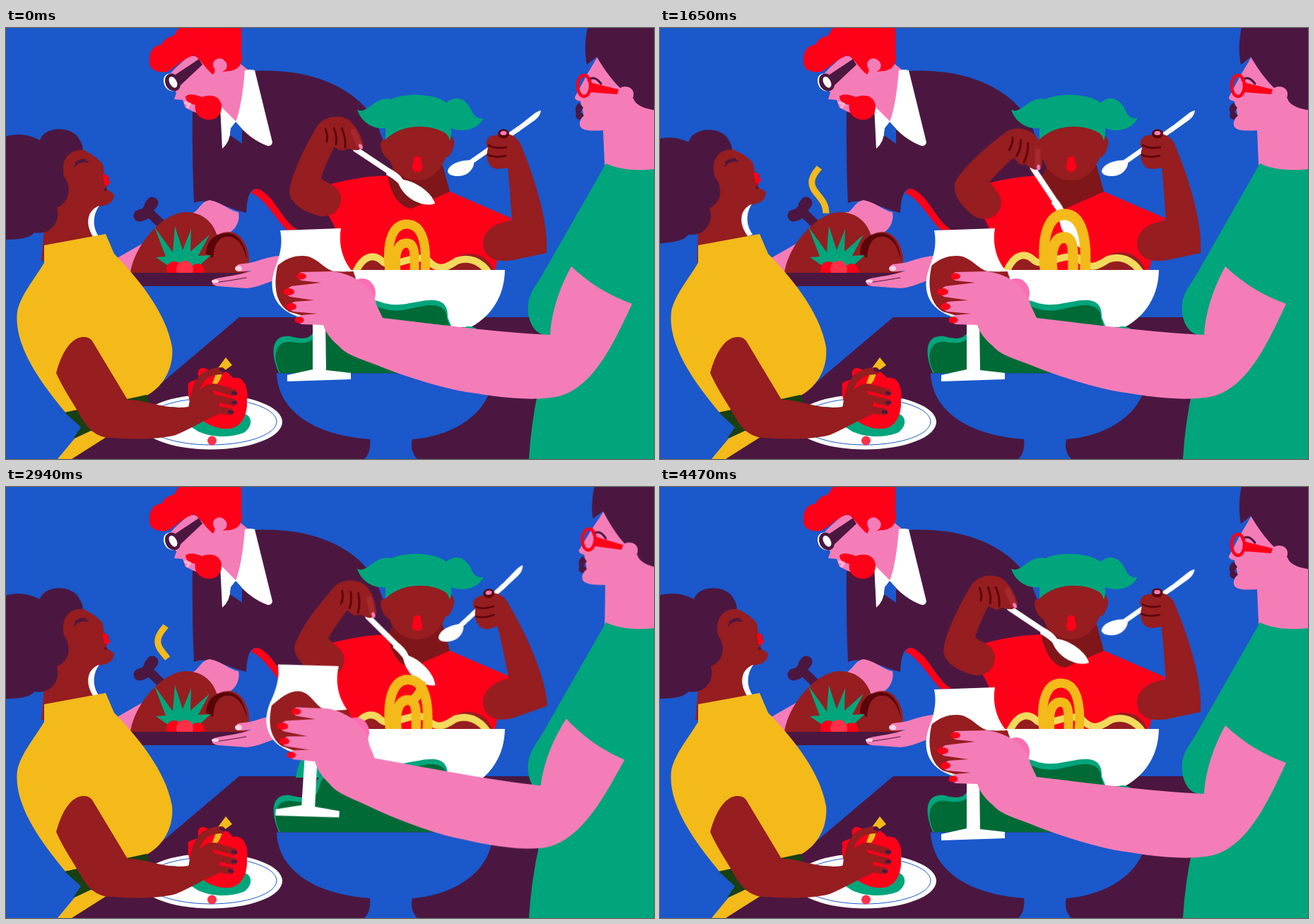
An HTML page for the animation above (4.5 s loop, 917x611 px).

```html
<!DOCTYPE html>
<html lang="en">
<head>
<meta charset="utf-8">
<title>Dinner party</title>
<style>
html, body { margin: 0; width: 100%; height: 100%; overflow: hidden; background: #1b58cb; }
svg { display: block; width: 917px; height: 611px; }

.blue { fill: #1b58cb; } .plum { fill: #4b1740; } .red { fill: #ff0019; } .pink { fill: #f47db8; }
.brown { fill: #961d20; } .maroon { fill: #5a0508; } .green { fill: #00a57b; } .forest { fill: #006a36; }
.gold { fill: #f3ba1a; } .white { fill: #fff; } .coral { fill: #ff3048; }
.line { fill: none; stroke-linecap: round; stroke-linejoin: round; }
.s-plum { stroke: #4b1740; } .s-maroon { stroke: #5a0508; } .s-gold { stroke: #f3ba1a; }
.s-brown { stroke: #961d20; } .s-white { stroke: #fff; }

.move { animation: 4.5s ease-in-out infinite; }

.sniff { animation-name: sniff; transform-origin: 90px 290px; }
@keyframes sniff {
  0%, 1%, 53.5%, 63.5%, 99.5%, 100% { transform: none; }
  13%, 39%, 77.5%, 85.5% { transform: rotate(-3.3deg); }
}
.dip { animation-name: dip; transform-origin: 450px 243px; }
@keyframes dip {
  0%, 1%, 53.5%, 59%, 100% { transform: translate(0, 0) rotate(0deg); }
  25%, 38%, 71.8%, 85.5% { transform: translate(9px, 4px) rotate(22.5deg); }
}
.feed { animation-name: feed; transform-origin: 700px 305px; }
@keyframes feed {
  0%, 37.5%, 71.8%, 78%, 100% { transform: rotate(0deg); }
  52%, 59%, 91% { transform: rotate(-15.2deg); }
}
.toast { animation-name: toast; transform-origin: 948px 219px; }
@keyframes toast {
  0%, 37.3%, 84.7%, 100% { transform: rotate(0deg); }
  58.6% { transform: rotate(4.2deg); }
}
.lean { animation-name: lean; transform-origin: 955px 195px; }
@keyframes lean {
  0%, 37.3%, 84.7%, 100% { transform: rotate(0deg); }
  58.6% { transform: rotate(3.8deg); }
}
.wine { animation-name: wine; }
@keyframes wine {
  0%, 38%, 72%, 96%, 100% { d: path("M370 352C388 330 402 323 420 323C440 323 450 343 465 345C478 346 490 345 500 345V420H370Z"); }
  48% { d: path("M370 338C388 333 402 344 422 342C440 340 450 326 465 325C478 325 490 335 500 338V420H370Z"); }
  58.6% { d: path("M370 364C392 350 402 323 420 323C434 323 440 345 452 348C470 352 484 344 500 342V420H370Z"); }
  84% { d: path("M370 346C392 322 404 346 416 330C434 308 446 334 462 338C474 341 490 345 500 346V420H370Z"); }
}
.twirl { animation-name: twirl; transform-origin: 566px 343px; }
@keyframes twirl {
  0%, 14%, 50%, 62%, 82%, 100% { transform: none; }
  28%, 38%, 70%, 73% { transform: translateX(5px) scale(1.12, 1.21); }
}
.wave { animation-name: wave; }
@keyframes wave {
  0%, 13.3%, 58%, 83%, 100% { transform: none; }
  6.6%, 91% { transform: translate(-2px, 1px); }
  30%, 38%, 71% { transform: translate(-4px, -2px); }
}
.slurp { stroke-dasharray: 1 3; animation-name: slurp; }
@keyframes slurp {
  0%, 42%, 67%, 100% { stroke-dashoffset: 1.02; }
  56%, 59.5% { stroke-dashoffset: 0; }
}
.glint { animation-name: glint; transform-origin: 360px 276px; }
@keyframes glint {
  0%, 53%, 64%, 100% { transform: scale(0); }
  57.5%, 59.5% { transform: scale(1); }
}
.steam { animation-timing-function: linear; }
.steam-a { stroke-dasharray: .8 3; animation-name: steam-a; }
@keyframes steam-a {
  0%, 4.2%, 27.31%, 36%, 59.81%, 70.8%, 94.01%, 100% { stroke-dashoffset: .8; }
  27.3%, 59.8%, 94% { stroke-dashoffset: -1; }
}
.steam-b { stroke-dasharray: .9 3; animation-name: steam-b; }
@keyframes steam-b {
  0%, 27.8%, 44.91%, 54.6%, 71.01%, 100% { stroke-dashoffset: .9; }
  44.9%, 71% { stroke-dashoffset: -1; }
}
</style>
</head>
<body>
<svg viewBox="0 0 917 611">
  <defs>
    <clipPath id="inGlass"><path d="M390 318C380 346 374 385 400 402L430 411H470L494 372L495 355L482 318Z"/></clipPath>
    <clipPath id="aboveBowl"><path d="M400 100H800V343H400Z"/></clipPath>
    <clipPath id="aboveTray"><path d="M150 200H360V347H150Z"/></clipPath>
  </defs>
  <rect class="blue" width="917" height="611"/>

  <!-- waiter -->
  <g>
    <path class="plum" d="M303 108L264 119Q263 185 266 248C290 239 318 258 340 262C341 242 344 230 353 228L406 287H520L550 200L530 150C518 108 462 55 350 61Z"/>
    <path class="red" d="M347 234C353 222 363 230 375 242C388 258 400 281 412 285L398 287C380 269 365 240 347 234Z"/>
    <path class="pink" d="M258 40C244 54 232 62 228 72C232 84 240 88 241 92L238 101L250 102L254 113L264 118L290 128L303 112L325 140L346 62L318 40Z"/>
    <path class="white" d="M338 60Q345 58 352 60L377 162Q376 168 370 167Q345 158 325 133Q334 110 338 60ZM303 110L326 133L318 144Q317 162 306 171Z"/>
    <path class="blue" d="M318 142L325 133L334 143V164L317 152Z"/>
    <path class="red" d="M249 -3C238 4 242 10 234 12C224 14 222 22 219 24C208 24 202 36 203 47C202 58 212 64 228 62C240 57 252 42 266 39C276 44 282 58 293 66Q297 62 295 56A9 9 0 1 1 306 62L316 61C326 60 334 54 334 42C332 28 335 10 332 -3Z"/>
    <circle class="pink" cx="302" cy="52" r="9"/>
    <path class="plum" d="M240 66L273 44L278 52L246 82Z"/>
    <ellipse class="white" cx="234" cy="77" rx="10.5" ry="13" transform="rotate(-28 234 77)"/>
    <ellipse class="plum" cx="236" cy="77" rx="10.5" ry="13" transform="rotate(-28 236 77)"/>
    <ellipse class="white" cx="236.500" cy="77" rx="5" ry="8.500" transform="rotate(-28 236 77)"/>
    <path class="red" d="M254 97C260 92 270 95 277 98C290 93 302 96 305 109C306 124 296 131 286 130C272 129 266 118 268 109C262 108 254 105 254 97Z"/>
    <path class="line" stroke="#ffb0d2" stroke-width="4" d="M254 106L260 108L257 112"/>

    <path class="line s-gold move steam steam-a" style="stroke-linecap:butt" stroke-width="9" pathLength="1" d="M264 266C262 236 238 232 243 213C245 204 249 200 254 193"/>
    <path class="line s-gold move steam steam-b" style="stroke-linecap:butt" stroke-width="9" pathLength="1" d="M234 270C240 240 212 236 215 216C217 206 222 203 226 197"/>

    <path class="pink" d="M264 263C275 256 276 246 288 244C305 247 318 260 329 261C332 276 322 291 308 293L280 292ZM154 328L194 305L176 349Z"/>
    <path class="line s-plum" stroke-width="13" d="M199 258L225 283"/>
    <path class="line s-plum" stroke-width="17" d="M207 248L204 252M189 266L195 264"/>
    <path class="brown" d="M176 347C181 310 220 262 254 261C280 261 296 278 300 300L302 347Z"/>
    <path class="brown" d="M282 347C278 305 295 289 316 289C334 290 344 312 344 330L341 347Z"/>
    <path class="maroon" d="M283 320C284 300 296 291 314 291C330 291 340 310 341 328C334 300 322 294 310 296C300 298 294 308 293 326Z"/>
    <g clip-path="url(#aboveTray)">
      <path class="green" d="M228 336L212 325L226 324L210 282L236 318L239 281L250 315L262 285L261 317L288 293L272 323L290 322L270 340Z"/>
      <circle class="red" cx="238" cy="342" r="11"/><circle class="red" cx="271" cy="344" r="10"/>
      <circle class="coral" cx="253" cy="342" r="12"/>
    </g>
    <path class="plum" d="M174 347H345L340 366H179Z"/>
    <path class="pink" d="M395 322C368 324 356 331 345 333L329 335C322 339 327 347 336 345L348 344C330 351 308 352 295 356C290 360 291 365 300 366L340 369C362 367 372 358 400 352Z"/>
    <path class="line s-plum" stroke-width="1" d="M296 361Q318 358 340 354"/>
    <ellipse cx="329" cy="341" rx="5" ry="4" fill="#ffd3e6"/><ellipse cx="296" cy="359" rx="5" ry="2.500" fill="#ffd3e6"/>
  </g>
  <path class="red move glint" d="M360 253Q364 269 375 276Q364 283 360 299Q356 283 345 276Q356 269 360 253Z"/>

  <path class="plum" d="M330 410H760V611H93Z"/>

  <!-- diner in the middle -->
  <g>
    <path class="red" d="M460 221C490 214 520 208 545 210L626 231L716 270C690 295 702 318 691 345H468C476 310 470 285 454 263Z"/>
    <path d="M540 212C546 236 556 254 574 256L628 232L618 195H548Z" fill="#7f161a"/>
    <path class="brown" d="M530 168Q529 158 538 158L537 150C555 128 608 128 626 152Q636 154 634 166Q630 182 622 184C614 206 598 216 582 216C564 216 548 204 543 188Q533 182 530 168Z"/>
    <path class="green" d="M497 116C512 123 522 95 546 101C562 92 606 92 623 106C640 92 654 104 660 120Q666 130 676 128C666 146 645 148 630 142Q631 152 628 160Q626 150 618 147C596 136 560 136 537 158V142C520 144 503 134 497 116Z"/>
    <path class="red" d="M582 182C588 182 588 187 587 190C592 196 589 204 582 204C575 204 572 196 577 190C576 187 576 182 582 182Z"/>
  </g>

  <g class="move feed">
    <path class="s-white line" stroke-width="7" d="M658 190L725 143"/>
    <path class="white" d="M720 143L748 121Q754 117 757 117Q756 125 748 131L724 148Z"/>
    <path class="white" d="M625 203C627 192 646 186 662 188C664 198 654 210 640 210Q626 210 625 203Z"/>
    <path class="brown" d="M716 273C688 276 672 291 676 311C680 330 700 333 722 328L765 319C768 275 748 212 728 164C720 148 702 148 697 152C680 150 677 164 682 170C678 184 682 200 697 200L710 198C713 225 714 250 716 273Z"/>
    <path class="line s-maroon" stroke-width="2.500" d="M683 166Q692 172 708 169M682 180Q693 185 707 181"/>
    <ellipse class="maroon" cx="704" cy="150" rx="8" ry="6.500"/><ellipse cx="704" cy="149" rx="4.500" ry="3" class="pink"/>
  </g>

  <g class="move dip">
    <path class="line s-white" stroke-width="8" d="M495 172L546 206"/>
    <path class="white" d="M540 198Q556 205 562 215C582 218 604 235 607 249C594 254 566 246 555 220Q546 212 538 208Z"/>
    <path class="brown" d="M401 232C404 205 425 165 441 138C452 123 478 121 489 134C498 143 504 156 506 167L499 173C490 175 485 168 479 173C474 176 470 170 464 169C457 184 449 201 446 213C456 222 471 222 474 240C475 257 462 268 446 267C424 262 402 250 401 232Z"/>
    <path class="line" stroke="#a52a30" stroke-width="8" d="M492 147L500 166"/>
    <path class="line s-maroon" stroke-width="2.800" d="M452 143Q456 152 454 161M464 142Q469 154 467 165M475 142Q481 155 480 169"/>
    <ellipse class="pink" cx="502" cy="168" rx="2.500" ry="4" transform="rotate(-25 502 168)"/>
  </g>

  <!-- pasta and bowls -->
  <g clip-path="url(#aboveBowl)">
    <g class="move wave">
      <path class="brown" d="M500 350C506 325 530 318 546 350ZM604 350C625 336 638 320 655 320C678 320 688 334 692 350Z"/>
      <path class="line" stroke="#f3da5c" stroke-width="10" d="M494 348C506 320 522 320 534 332C548 342 575 320 596 328C612 348 626 338 638 330C655 324 672 330 684 348"/>
    </g>
    <g class="line s-gold">
      <g class="move twirl" stroke-width="13">
        <path d="M543 345C537 300 549 278 567 278C590 278 596 308 593 345M552 345C549 316 556 304 568 305C580 306 578 325 578 345"/>
      </g>
      <path class="move slurp" stroke-width="13" pathLength="1" d="M578 300C592 288 592 268 580 252C566 236 546 228 551 213C556 200 574 198 586 206C606 220 620 262 638 265C654 266 655 240 662 227"/>
    </g>
  </g>
  <path class="white" d="M480 343H706C705 384 684 410 658 424H500Z"/>
  <path class="green" d="M410 412Q413 392 419 386L445 384V412ZM637 432Q655 414 673 432Z"/>
  <path class="green" d="M386 489C372 456 378 434 402 437C430 445 436 436 440 416C460 386 500 380 526 387C552 397 568 390 584 388C612 382 626 388 625 410L634 432V489Z"/>
  <path class="forest" d="M388 489.500C374 462 384 442 404 445C432 450 440 442 446 416C466 392 500 388 526 395C552 406 568 398 586 395C614 389 624 398 624 412L634 440V489.500Z"/>
  <path class="blue" d="M383 489.500H688C690 540 640 578 575 583Q571 600 582 611H507Q517 602 515 583C440 578 385 545 383 489.500Z"/>

  <!-- plate -->
  <ellipse class="white" cx="290" cy="558.500" rx="101" ry="39"/>
  <ellipse cx="290" cy="558" rx="93" ry="33" fill="none" stroke="#1b58cb"/>
  <path class="green" d="M218 541C235 532 250 540 264 546L334 546C350 548 350 566 336 574C315 582 290 580 272 572C256 562 240 548 218 541Z"/>
  <path class="red" d="M258 508C254 500 272 500 273 496C268 482 278 478 288 486C300 480 314 486 321 496C336 492 344 510 341 528C342 548 334 566 316 568C290 570 268 552 262 535Q256 520 258 508Z"/>
  <path class="gold" d="M292 504L300 482L311 467L320 478L306 488Q304 500 298 505Z"/>
  <circle class="coral" cx="291.500" cy="585" r="6.500"/>

  <!-- diner on the left -->
  <g class="move sniff">
    <path class="brown" d="M50 330L54 285L70 215C66 180 90 160 112 174Q128 182 137 193L139 206L146 212L142 228L153 236C152 248 145 251 131 253C120 258 114 275 124 296L132 330Z"/>
    <path class="plum" d="M-40 168C-10 160 10 140 48 159C55 138 96 138 105 160C110 168 110 175 105 173C86 174 78 190 82 210C96 230 86 250 72 254C78 276 62 294 40 290C32 300 14 301 -40 300Z"/>
    <path class="white" d="M132 252C115 258 111 278 124 297L131 295C121 280 124 263 132 252Z"/>
    <path class="line s-plum" stroke-width="2" d="M97 196Q104 187 116 190"/>
    <path class="line s-plum" stroke-width="3" d="M99 191Q105 187 112 187"/>
    <path class="red" d="M137 207L145 210L144 215L148 218L143 224L139 222Z"/>
    <circle class="plum" cx="141" cy="229" r="2"/>
  </g>
  <path class="gold" d="M54 308L141 292L153 320C182 350 226 400 235 452C238 485 220 510 199 521L84 545C50 504 10 450 16 402C20 380 40 356 54 333Z"/>
  <path d="M83 545L199 520L204 535L120 572L95 582L106 566Z" fill="#184012"/>
  <path class="gold" d="M97 582L120 571L145 578L93 611H73Z"/>
  <path class="brown" d="M71 489C79 460 92 438 110 438Q120 438 124 447L172 527C198 526 224 542 258 537C264 522 272 512 286 505L302 530L300 548C280 556 262 568 240 577C214 584 178 583 146 581C128 580 116 568 107 553C98 536 82 514 71 489Z"/>
  <g class="line s-brown" stroke-width="10">
    <path d="M264 534Q268 503 281 493Q292 486 305 486"/>
    <path d="M270 526Q286 506 298 510L322 517"/>
    <path d="M270 540Q290 520 302 526L322 531"/>
    <path d="M272 551Q292 538 304 542L317 544"/>
  </g>
  <path class="line s-plum" stroke-width="4.500" d="M304 484L309 486M321 517L325 518M321 531L325 531M316 544L320 545"/>

  <!-- diner on the right -->
  <g class="move lean">
    <path class="pink" d="M838 38C830 54 824 62 820 70L805 98Q804 102 813 104L817 122L812 133C810 144 820 147 845 145L848 215H940V60Z"/>
    <path class="plum" d="M836 -40C818 0 818 30 822 52L836 41C846 58 858 74 868 84L888 100C892 112 908 117 950 120V-40Z"/>
    <path class="pink" d="M865 92C866 80 886 80 888 92C889 104 880 107 870 103Z"/>
    <path class="line s-plum" stroke-width="3" d="M824 74Q832 66 842 79"/>
    <ellipse cx="818" cy="82" rx="9" ry="15" fill="none" stroke="#ff0019" stroke-width="4.500"/>
    <path class="red" d="M826 77L867 87L865 94L826 91Z"/>
    <path class="plum" d="M811 106L817 113L813 119L818 124L812 130Q804 128 807 121Q803 113 811 106Z"/>
  </g>
  <path class="green" d="M849 192C870 202 895 203 930 199V611H740Q743 560 754 510L765 436C740 432 736 402 740 385C744 370 752 362 760 348Z"/>

  <g class="move toast">
    <ellipse cx="504" cy="376" rx="19" ry="21" fill="#f96fb2"/>
    <path class="white" d="M388 287L474 284C470 306 476 328 489 344C502 378 484 408 452 414L453 485L488 489V498L398 501V492L434 484V412C396 411 366 386 380 343C388 322 392 306 388 287Z"/>
    <g clip-path="url(#inGlass)">
      <path class="brown move wine" d="M370 352C388 330 402 323 420 323C440 323 450 343 465 345C478 346 490 345 500 345V420H370Z"/>
    </g>
    <path class="pink" d="M800 338C825 362 855 380 886 391C862 442 834 506 786 521C745 532 682 521 640 514C596 504 560 492 525 478C500 468 482 464 470 450C458 440 452 430 449 421L418 420Q405 413 418 407L440 405L406 402Q393 395 408 388L436 386L402 381Q389 374 404 366L446 361L418 358Q407 352 418 346L462 345C490 348 520 366 524 392L533 411C610 420 700 432 770 435C772 400 785 365 800 338Z"/>
    <g class="red">
      <ellipse cx="418" cy="352" rx="7" ry="4.500"/><ellipse cx="400" cy="374" rx="8" ry="5"/>
      <ellipse cx="404" cy="395" rx="7" ry="5"/><ellipse cx="415" cy="414" rx="6.500" ry="4.500"/>
    </g>
  </g>
</svg>
</body>
</html>
```
